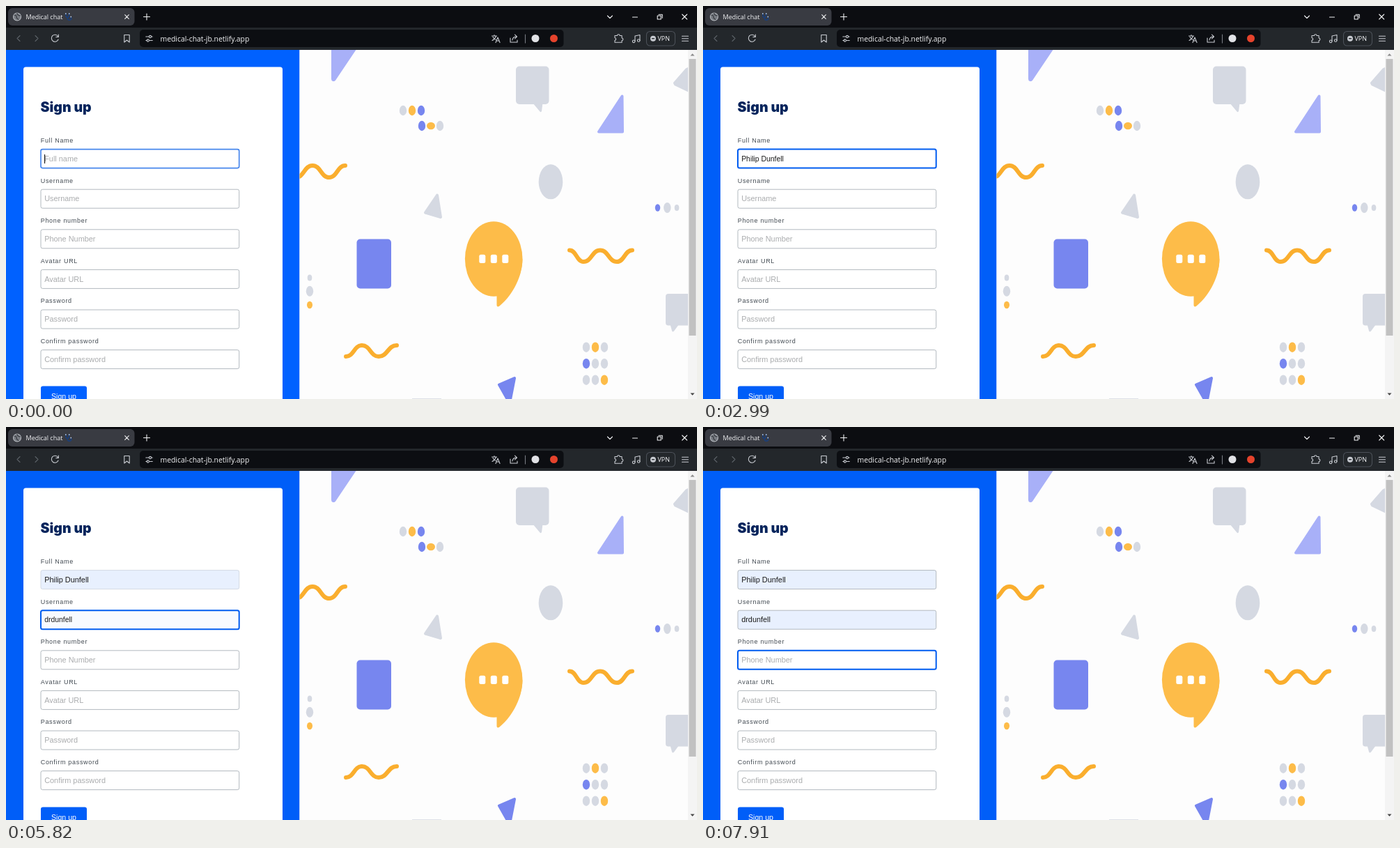
Animation of 992x564 px, one loop 8000 ms. Source, as an HTML page:

```html
<!DOCTYPE html>
<html lang="en">
<head>
<meta charset="utf-8">
<title>Sign up form</title>
<style>
  html, body { margin: 0; width: 100%; height: 100%; overflow: hidden; background: #fdfdfd; }
  svg { display: block; width: 100vw; height: 100vh; }
  text { white-space: pre; }
  .ui { font-family: "Open Sans", "Noto Sans", sans-serif; fill: #f3f4f6; }
  .icon { fill: none; stroke: #c9ccd2; stroke-width: 1.1; stroke-linecap: round; stroke-linejoin: round; }
  .dim { stroke: #5b6068; }
  .bright { stroke: #f0f1f3; }
  .form { font-family: "Liberation Sans", Arial, sans-serif; font-size: 10.9px; }
  .label { font-size: 9px; letter-spacing: .7px; fill: #424a52; }
  .title { font: 900 19.5px Inter, sans-serif; fill: #05245c; }
  .brand { fill: #0061ff; }
  .gray { fill: #d5d9e2; stroke: #d5d9e2; }
  .lilac { fill: #a8b0f8; stroke: #a8b0f8; }
  .blue { fill: #7786ef; stroke: #7786ef; }
  .gold { fill: #fdbc49; stroke: #fdbc49; }
  .poly { stroke-width: 4; stroke-linejoin: round; }
  .dot { stroke: none; }
  .wave { fill: none; stroke: #faae2e; stroke-width: 6; stroke-linecap: round; }
</style>
</head>
<body>
<svg viewBox="0 0 992 564">
  <defs>
    <clipPath id="pane"><rect x="421.5" y="63" width="557.5" height="501"/></clipPath>
  </defs>

  <!-- browser frame -->
  <rect width="992" height="32" fill="#0c0d11"/>
  <rect y="31" width="992" height="32" fill="#23272b"/>
  <rect x="3" y="3" width="181.500" height="25" rx="6" fill="#393b42"/>
  <g class="icon">
    <circle cx="16" cy="15.500" r="5.500" fill="#777b82" stroke="#b5b8be"/>
    <path d="M12 13q3 0 3 2.500t3 4M16 10.500q0 3 4.500 3.500" stroke="#33363c"/>
    <path class="bright" d="M170.700 12.700l5.600 5.600m0-5.600l-5.600 5.600M202 11v9m-4.500-4.500h9"/>
    <path class="bright" d="M863.500 14l3.500 3.500 3.500-3.500M899.500 16h7M970.700 12l7 7m0-7l-7 7"/>
    <path class="bright" d="M935.200 14h5v5h-5zM937 12.300h5.200v5"/>
    <path class="dim" d="M20 42.500l-4 4 4 4M42 42.500l4 4-4 4"/>
    <path d="M74.500 43.500a5 5 0 1 0 .5 4.500M75.300 41v3.500h-3.500"/>
    <path d="M169.800 41.500h7.400v10.500l-3.700-3-3.700 3z"/>
    <path d="M200.500 44h4m4 0h1.500M200.500 49.500h1.500m4 0h4"/>
    <circle cx="206.500" cy="44" r="1.700"/><circle cx="203.800" cy="49.500" r="1.700"/>
  </g>
  <path d="M86 10.500v3.500a2.200 2.200 0 0 0 4.400 0v-3.500M88.200 16.500q0 4 3.300 3.500t1.800-4" fill="none" stroke="#1c3f77" stroke-width="1.800"/>
  <path d="M85 11h1.500m3.500 0h1.500M92.500 15.500h1.500" stroke="#c7d8ee" stroke-width="1.500"/>
  <text class="ui" x="28.500" y="18.700" font-size="9">Medical chat</text>
  <rect x="192" y="34" width="608.500" height="25" rx="5" fill="#0c0e12"/>
  <g class="icon">
    <path d="M200.800 44h4m4 0h1.500M200.800 49.500h1.500m4 0h4"/>
    <circle cx="207" cy="44" r="1.600"/><circle cx="203.800" cy="49.500" r="1.600"/>
    <path d="M697.500 43h7m-3.500-1.500v1.500m2.500 0q-1 4-5.500 6.500m1-5q1.500 3 4 4M703 52.500l3-7.500 3 7.500m-5-2.500h4"/>
    <path d="M724 46v6h10v-3M727 49q.5-5 6-5m-2.500-2.800l3 2.800-3 2.800"/>
    <path d="M745.500 41v12" stroke="#777b82"/>
    <path d="M874 42.500h3.500a1.800 1.800 0 0 1 3.600 0h3v3.500a1.800 1.800 0 0 1 0 3.600v2.600h-10.100v-3a1.700 1.700 0 0 0 0-3.400z"/>
    <path d="M903 50.500v-7.500l7-1.500v8"/><circle cx="901.200" cy="50.800" r="1.800"/><circle cx="908.200" cy="49.500" r="1.800"/>
    <rect x="919.500" y="36.500" width="41" height="20.500" rx="5" stroke="#4b5058"/>
    <path d="M970.500 43.200h9m-9 3.500h9m-9 3.500h9"/>
  </g>
  <text class="ui" x="221.500" y="50.500" font-size="10.400">medical-chat-jb.netlify.app</text>
  <circle cx="760" cy="46.500" r="5.500" fill="#e1e2e6"/>
  <circle cx="786.500" cy="46.500" r="5.500" fill="#e5432c"/>
  <circle cx="929" cy="46.700" r="4" fill="#c9ccd2"/>
  <path d="M927 46.700h4" stroke="#23272b" stroke-width="1.300"/>
  <text class="ui" x="935.500" y="49.900" font-size="9">VPN</text>

  <!-- form panel -->
  <rect class="brand" y="63" width="421.500" height="501"/>
  <rect x="25" y="87.500" width="372" height="490" rx="3.500" fill="#fff"/>
  <text class="title" x="49.500" y="151.500">Sign up</text>
  <g id="fields" class="form"></g>
  <rect class="brand" x="50" y="545.500" width="66" height="30" rx="3"/>
  <text class="form" x="65" y="564" fill="#fff" style="font-size:10.600px">Sign up</text>

  <!-- illustration -->
  <rect x="421.500" y="63" width="558" height="501" fill="#fdfdfd"/>
  <g id="art" clip-path="url(#pane)">
    <path class="lilac poly" d="M469 60h33L471.500 105.500q-2.500 1.500-2.500-1z"/>
    <path class="lilac poly" d="M884.500 129.500l.5 51h-34z"/>
    <path class="gray poly" d="M984 88l-7 3-17 19.500 1 2 23 11z"/>
    <path class="gray poly" d="M619 271.500l-17 25 22 6.500z"/>
    <path class="blue poly" d="M708 543.500l22-9.500-7 36z"/>
    <rect class="gray dot" x="732" y="86.500" width="47.500" height="54.500" rx="5"/>
    <path class="gray dot" d="M756 139h14.500l-1.500 12q-1 2-2.500.500z"/>
    <rect class="gray dot" x="947" y="413" width="48" height="45.500" rx="4"/>
    <path class="gray dot" d="M953.500 457h12.500l-7 9.500q-2.500 2-3-.500z"/>
    <rect class="blue dot" x="503.500" y="334.500" width="49.500" height="71" rx="5"/>
    <path class="gray" d="M583 564h42" stroke-width="1.500"/>
    <path class="gold dot" d="M741.500 363c0 22-12 50-33 67.500q-3.500 2.500-4-1V416.500Z"/>
    <ellipse class="gold dot" cx="700.200" cy="363" rx="41.300" ry="53.800"/>
    <g fill="#fff">
      <rect x="679.300" y="356.700" width="9" height="12.300" rx="2.500"/>
      <rect x="695.800" y="356.700" width="9" height="12.300" rx="2.500"/>
      <rect x="712.300" y="356.700" width="9" height="12.300" rx="2.500"/>
    </g>
  </g>

  <!-- scrollbar -->
  <rect x="979" y="63" width="13" height="501" fill="#f4f4f4"/>
  <rect x="980.500" y="76" width="10" height="397" fill="#c1c1c1"/>
  <path d="M982.500 71.500l3-3.200 3 3.200z" fill="#8b8b8b"/>
  <path d="M982.500 555.500l3 3.200 3-3.200z" fill="#444"/>

  <path id="mouse" d="M0 0v12.500l2.900-2.600 2 4.300 2-.9-1.900-4.200h4z" fill="#fff" stroke="#222" stroke-width=".9"/>
</svg>

<script>
const LOOP = 8000, STEP = 57.6, TICK = 80;
const $ = id => document.getElementById(id);
const clamp = v => Math.max(0, Math.min(1, v));
const mix = (a, b, k) => a.map((v, i) => v + (b[i] - v) * k);
const rgb = c => `rgb(${c.map(Math.round)})`;

function add(parent, tag, attrs, text = '') {
  const el = document.createElementNS('http://www.w3.org/2000/svg', tag);
  for (const key in attrs) el.setAttribute(key, attrs[key]);
  el.textContent = text;
  return parent.appendChild(el);
}

// Illustration: dots and waves
const art = $('art');
const dot = (kind, cx, cy, rx = 5.2, ry = 7.2) =>
  add(art, 'ellipse', { class: kind + ' dot', cx, cy, rx, ry });

['gray', 'gold', 'blue'].forEach((kind, i) => dot(kind, 570 + 13 * i, 150));
dot('blue', 597, 172);
dot('gold', 610, 172, 6, 5.2);
dot('gray', 623, 172);
dot('gray', 782, 252.3, 17.3, 25);
dot('blue', 935.5, 289.5, 3.7, 5.2);
dot('gray', 949.3, 289.5, 5.2, 7.5);
dot('gray', 963, 289.5, 3.3, 4.5);
dot('gray', 436, 390, 3.3, 4.5);
dot('gray', 436, 409.3, 5.2, 7.5);
dot('gold', 436, 429, 4, 5.3);
[...'xyxbxxxxy'].forEach((c, i) =>
  dot({ x: 'gray', y: 'gold', b: 'blue' }[c], 833 + 13 * (i % 3), 489.7 + 23.5 * Math.floor(i / 3)));

function wave(xs, y, next) {
  let d = `M${xs[0]} ${y}`;
  for (let i = 1; i < xs.length; i++) {
    const mid = (xs[i - 1] + xs[i]) / 2;
    d += `C${mid} ${y} ${mid} ${next} ${xs[i]} ${next}`;
    [y, next] = [next, y];
  }
  add(art, 'path', { class: 'wave', d });
}
wave([416, 440, 464, 487], 246, 229);
wave([809, 829, 853, 877, 899], 350.5, 367);
wave([488, 511, 535, 561], 503, 487);

// Form state over time
const NAME = 'Philip Dunfell', USER = 'drdunfell';
const fields = [
  { label: 'Full Name', hint: 'Full name', focus: [-80, 3540], hover: [[-500, 6880]], fill: 3540,
    typed: [[2170, 'P'], [2990, NAME, true], [3300, NAME]],
    caretOn: [[0, 430], [940, 1510], [2000, 2740], [3300, 3550]] },
  { label: 'Username', hint: 'Username', focus: [3540, 7400], hover: [], fill: 5810,
    typed: [[4530, 'd'], [4770, 'dr'], [5100, 'drd'], [5250, 'drdu'], [5820, USER, true], [6060, USER]],
    caretOn: [[3550, 4110], [4530, 5820], [6060, 6630], [7130, 7410]], marked: [6230, 7410] },
  { label: 'Phone number', hint: 'Phone Number', focus: [7400, 9000], hover: [[7330, 9000]],
    caretOn: [[7410, 7910]] },
  { label: 'Avatar URL', hint: 'Avatar URL', hover: [[7100, 7260]] },
  { label: 'Password', hint: 'Password' },
  { label: 'Confirm password', hint: 'Confirm password' }
];
const IDLE = [178, 185, 191], HOVER = [211, 218, 228], FOCUS = [0, 92, 240];
const WHITE = [255, 255, 255], AUTOFILL = [232, 240, 254];
const within = (t, span) => t >= span[0] && t < span[1];
const ease = (t, start) => clamp((Math.floor((t - start) / TICK) + 1) / 3);
const span = (t, [from, to]) => ease(t, from) - ease(t, to);

fields.forEach((f, i) => {
  const g = add($('fields'), 'g', { transform: `translate(0 ${i * STEP})` });
  add(g, 'text', { class: 'label', x: 49.7, y: 196 }, f.label);
  f.box = add(g, 'rect', { x: 50, y: 205.6, width: 284.7, height: 27, rx: 2.5 });
  f.text = add(g, 'text', { x: 55.2, y: 222.8 });
  f.mark = add(g, 'path', { fill: 'none', stroke: '#e0404a', 'stroke-width': 1.4, 'stroke-dasharray': '2 1.2' });
  f.caret = add(g, 'rect', { y: 213, width: 1.1, height: 13, fill: '#111' });
});

function drawField(f, t) {
  const focus = f.focus ? span(t, f.focus) : 0;
  const hover = (f.hover || []).reduce((sum, s) => sum + span(t, s), 0);
  const entry = (f.typed || []).filter(e => e[0] <= t).pop();
  f.box.setAttribute('fill', rgb(mix(WHITE, AUTOFILL, f.fill ? ease(t, f.fill) : 0)));
  f.box.setAttribute('stroke', rgb(mix(mix(IDLE, HOVER, hover), FOCUS, focus)));
  f.box.setAttribute('stroke-width', 1 + focus);

  f.text.textContent = entry ? entry[1] : f.hint;
  f.text.setAttribute('fill', entry ? '#1b1b1b' : '#aaacae');
  f.text.style.fontSize = entry && entry[2] ? '10.4px' : '10.9px';

  const end = 55 + (entry ? f.text.getComputedTextLength() : 0);
  f.caret.setAttribute('x', end);
  f.caret.style.display = (f.caretOn || []).some(s => within(t, s)) ? '' : 'none';
  f.mark.setAttribute('d', f.marked && within(t, f.marked) ? `M55 224.700H${end}` : '');
}

// Pointer: the arrow is hidden while it is over a text field
const path = [[6880, 104, 222], [6950, 102, 248], [7030, 100, 302], [7110, 97, 338],
  [7190, 95, 369], [7270, 96, 355], [7350, 98, 338]];

function drawMouse(t) {
  const at = path.filter(p => p[0] <= t).pop();
  const inField = at && (at[2] - 205) % STEP < 28;
  $('mouse').style.display = at && !inField ? '' : 'none';
  if (at) $('mouse').setAttribute('transform', `translate(${at[1]} ${at[2]})`);
}

const brand = document.querySelectorAll('.brand');
function frame() {
  const t = performance.now() % LOOP;
  const color = rgb(mix([0, 97, 255], [0, 94, 248], clamp((t - 90) / 680)));
  brand.forEach(el => el.style.fill = color);
  fields.forEach(f => drawField(f, t));
  drawMouse(t);
  requestAnimationFrame(frame);
}
frame();
</script>
</body>
</html>
```
